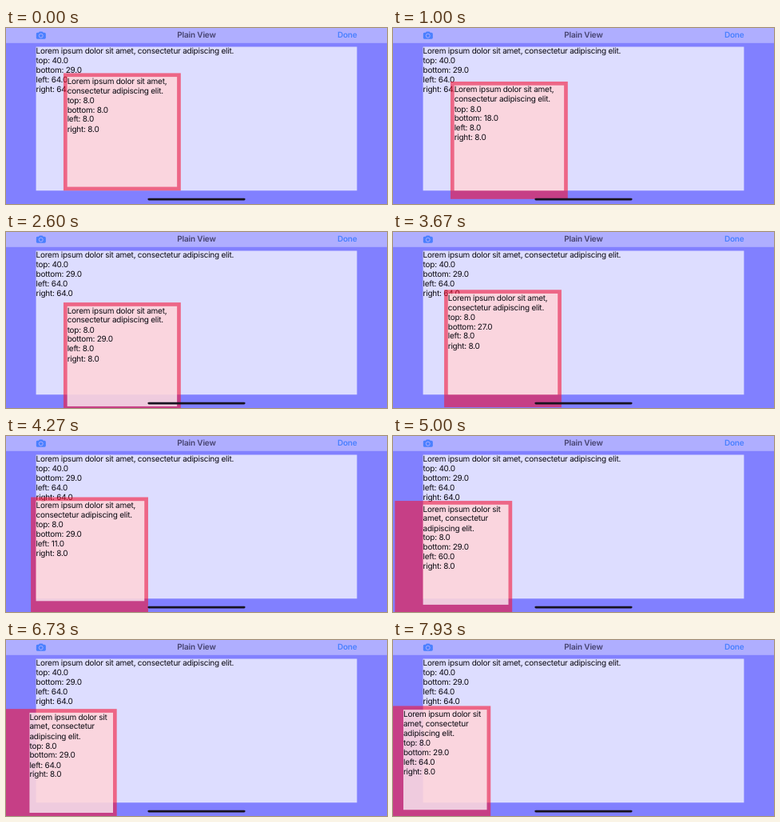
These frames come from a looping animation (477x220 px, 8000 ms). An HTML page:

```html
<!DOCTYPE html>
<html lang="en">
<head>
<meta charset="utf-8">
<title>Plain View</title>
<style>
  html, body { margin: 0; width: 100%; height: 100%; overflow: hidden; background: #8180ff; }
  /* laid out in points, then scaled to the stage */
  #stage {
    position: absolute; left: 0; top: 0; width: 812px; height: 375px; overflow: hidden;
    transform: scale(calc(477 / 812)); transform-origin: 0 0;
    background: #8180ff; color: #0c0a12;
    font: 17px/20.35px Inter, "Liberation Sans", sans-serif;
    letter-spacing: -.4px; text-rendering: geometricPrecision;
  }
  #stage > *, .margins, #nav > * { position: absolute; }
  .margins { background: rgba(255, 255, 255, .73); white-space: pre-line; }
  #safe { left: 64px; top: 40px; right: 64px; bottom: 29px; }
  #box { left: 0; top: 0; width: 250px; height: 250px; background: rgba(248, 18, 48, .585); }
  #nav { left: 0; top: 0; width: 100%; height: 32px; background: #afaeff; line-height: 32px; }
  #title { left: 0; width: 100%; text-align: center; font-weight: 600; color: #46436f; letter-spacing: -.3px; }
  #done { right: 64px; font-weight: 600; color: #4a80ff; }
  #camera { left: 64px; top: 7px; }
  #home { left: 302px; top: 362px; width: 208px; height: 5px; border-radius: 3px; background: #17131f; }
</style>
</head>
<body>
<div id="stage">
  <div id="safe" class="margins"></div>
  <div id="box"><div id="inner" class="margins"></div></div>
  <div id="nav">
    <svg id="camera" width="21" height="17" fill="#4a80ff">
      <path d="M3 3H5.5L7.5 .5H13.5L15.5 3H18Q21 3 21 6V13.5Q21 16.5 18 16.5H3Q0 16.5 0 13.5V6Q0 3 3 3Z"/>
      <circle cx="10.5" cy="9.5" r="4.2" stroke="#afaeff" stroke-width="1.6"/>
    </svg>
    <div id="title">Plain View</div>
    <div id="done">Done</div>
  </div>
  <div id="home"></div>
</div>
<script>
const LOOP = 8000, STEP = LOOP / 120;
const SIZE = 250, SAFE_LEFT = 64, SAFE_BOTTOM = 346;
const $ = id => document.getElementById(id);

// time, left, top of the dragged box
const path = [
  [0, 122.5, 96], [1000, 122.5, 114], [2600, 122.5, 150], [3670, 109, 123],
  [4330, 47.5, 131], [5000, 4, 138], [5270, 5, 140], [6070, -3.5, 145],
  [6730, -15.5, 146.7], [7000, -29, 144], [7930, -42, 140.3], [8000, -42, 140.3]
];

const slope = (i, c) => (path[i + 1][c] - path[i][c]) / (path[i + 1][0] - path[i][0]);

function tangent(i, c) {
  if (i === 0 || i === path.length - 1) return 0;
  const a = slope(i - 1, c), b = slope(i, c);
  return a * b > 0 ? 2 * a * b / (a + b) : 0;
}

// monotone cubic through the path
function at(t, c) {
  let i = 0;
  while (i < path.length - 2 && t >= path[i + 1][0]) i++;
  const span = path[i + 1][0] - path[i][0], u = (t - path[i][0]) / span, v = 1 - u;
  return path[i][c] * (1 + 2 * u) * v * v + tangent(i, c) * span * u * v * v
    + path[i + 1][c] * u * u * (3 - 2 * u) - tangent(i + 1, c) * span * u * u * v;
}

const label = insets => "Lorem ipsum dolor sit amet, consectetur adipiscing elit.\n" +
  Object.entries(insets).map(([side, n]) => `${side}: ${n.toFixed(1)}`).join("\n");

// a margin grows from 8 points to the full safe inset as the box leaves the safe area
const margin = (overlap, full) => Math.max(8, Math.min(full, Math.round(overlap)));

function draw(now) {
  const t = Math.floor((now % LOOP) / STEP + .01) * STEP;
  const x = at(t, 1), y = at(t, 2);
  const insets = {
    top: 8,
    bottom: margin(y + SIZE - SAFE_BOTTOM, 29),
    left: margin(SAFE_LEFT - x, 64),
    right: 8
  };
  $("box").style.transform = `translate(${x}px, ${y}px)`;
  for (const side in insets) $("inner").style[side] = insets[side] + "px";
  const text = label(insets);
  if ($("inner").textContent !== text) $("inner").textContent = text;
}

$("safe").textContent = label({ top: 40, bottom: 29, left: 64, right: 64 });
let start;
function tick(now) {
  start ??= now;
  draw(now - start);
  requestAnimationFrame(tick);
}
draw(0);
requestAnimationFrame(tick);
</script>
</body>
</html>
```
